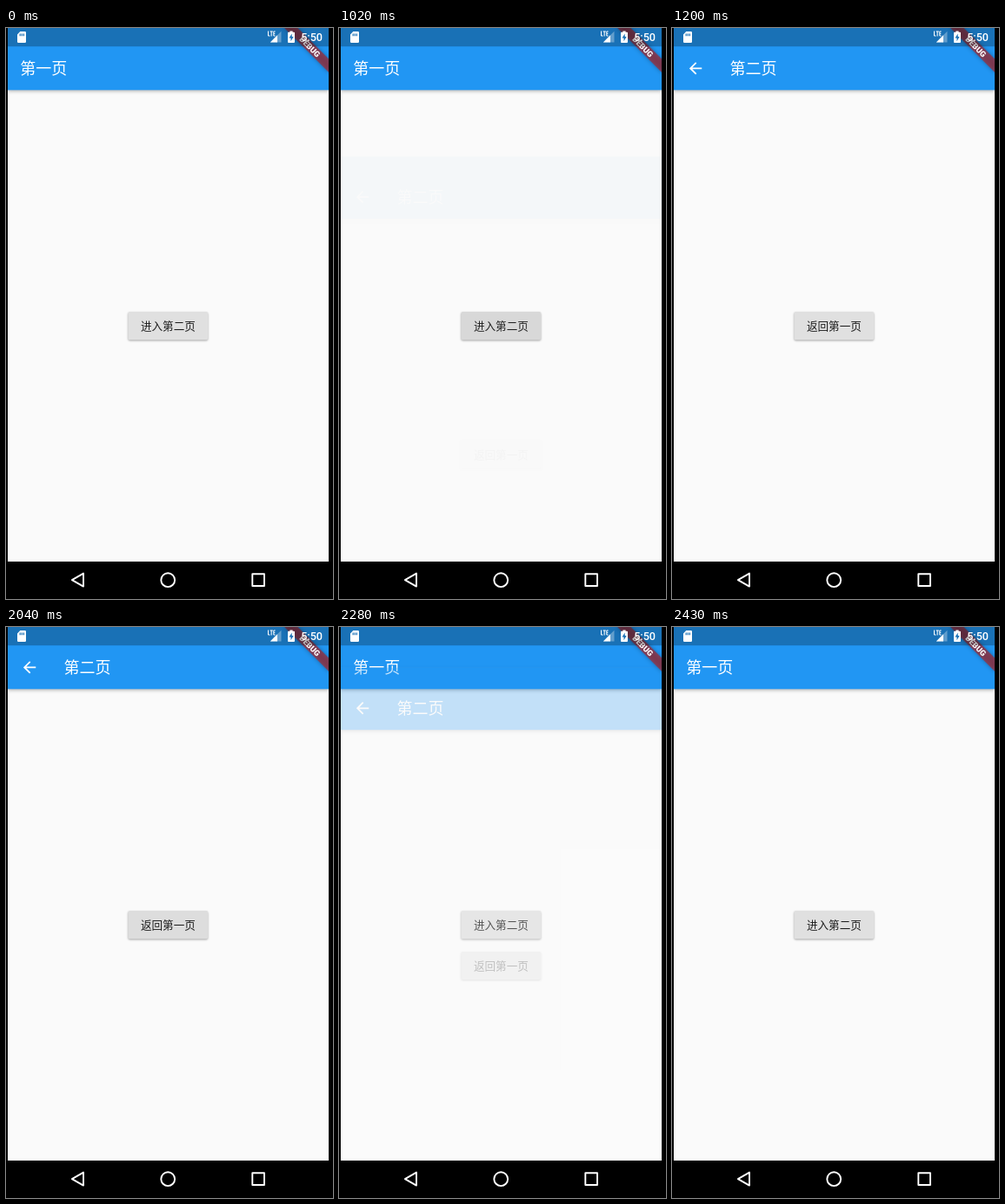
Write an HTML page that moves like this. It is 376 px wide and 656 px high and loops after 2.88 s.

```html
<!DOCTYPE html>
<html lang="zh-CN">
<head>
<meta charset="utf-8">
<title>页面跳转</title>
<style>
html, body { margin: 0; width: 100%; height: 100%; overflow: hidden; background: #000; }
svg { display: block; width: 376px; height: 656px; }
text { font-family: "Noto Sans CJK SC", "Noto Sans CJK", sans-serif; }
.title { font-size: 18px; fill: #fff; }
.label { font-size: 12.6px; fill: #000; fill-opacity: .87; text-anchor: middle; }
.bar { fill: #2196f3; filter: drop-shadow(0 1.5px 2px rgba(0, 0, 0, .32)); }
.button { fill: #e0e0e0; filter: drop-shadow(0 1.2px 1.2px rgba(0, 0, 0, .34)); }
.clock { font: 500 12.6px Roboto, sans-serif; fill: #fff; text-anchor: end; }
.debug { font: 900 9.16px Roboto, sans-serif; fill: #fff; text-anchor: middle; }
.ribbon { fill: #b71c1c; fill-opacity: .63; filter: drop-shadow(0 0 2.5px rgba(0, 0, 0, .5)); }
</style>
</head>
<body>
<svg viewBox="0 0 376 656">
  <defs>
    <clipPath id="screen"><rect x="2" y="0" width="369" height="613"/></clipPath>
  </defs>
  <rect width="376" height="656"/>
  <g clip-path="url(#screen)">
    <g id="first">
      <rect x="2" width="369" height="613" fill="#fafafa"/>
      <rect class="bar" x="2" width="369" height="71.3"/>
      <text class="title" x="16.2" y="53.4">第一页</text>
      <rect class="button" x="140.5" y="326" width="91.6" height="32.2" rx="1.8"/>
      <text class="label" x="186.4" y="346.8">进入第二页</text>
    </g>
    <g id="second">
      <rect x="2" width="369" height="613" fill="#fafafa"/>
      <rect class="bar" x="2" width="369" height="71.3"/>
      <path transform="translate(16.3 35.6) scale(.898)" fill="#fff"
        d="M20 11H7.83l5.59-5.59L12 4l-8 8 8 8 1.41-1.41L7.83 13H20z"/>
      <text class="title" x="66.5" y="53.4">第二页</text>
      <rect class="button" x="140.5" y="326" width="91.6" height="32.2" rx="1.8"/>
      <text class="label" x="186.4" y="346.8">返回第一页</text>
    </g>
    <g transform="translate(371 0) rotate(45)">
      <rect class="ribbon" x="-36" y="25.1" width="72" height="10.8"/>
      <text class="debug" x="0" y="33.8">DEBUG</text>
    </g>
    <rect x="2" width="369" height="21.2" fill-opacity=".25"/>
  </g>

  <!-- status icons -->
  <g fill="#fff">
    <path fill-rule="evenodd" d="M16.3 4H21.8Q23 4 23 5.2V15.8Q23 17 21.8 17H14.2Q13 17 13 15.8V7.4z
      M15.6 6.6v2.6h1.2V6.6z M17.7 6.6v2.6h1.2V6.6z M19.8 6.6v2.6h1.2V6.6z"/>
    <path d="M316.5 3.8V16.5H303.8z" fill-opacity=".32"/>
    <path d="M312 8.3V16.5H303.8z"/>
    <path d="M301.5 3.5V9H303.5 M303.6 4H306.8 M305.2 4V9.5 M309.6 4H307.8V9H309.6 M307.8 6.4H309.3"
      fill="none" stroke="#fff"/>
    <path d="M326.4 3.4h3.2v1.3h1.5q.9 0 .9.9v10.5q0 .9-.9.9h-6.2q-.9 0-.9-.9V5.600q0-.9.9-.9h1.500z"/>
    <path d="M328.7 6.6l-3.2 5h2v3.700l3.100-5.200h-1.900z" fill="#1970b6"/>
    <text class="clock" x="364" y="15.3">5:50</text>
  </g>

  <!-- navigation bar -->
  <g fill="none" stroke="#fff" stroke-width="1.9" stroke-linejoin="round">
    <path d="M89 626.6V641.6L75.900 634.1z"/>
    <circle cx="186.2" cy="634.2" r="7.9"/>
    <rect x="283.300" y="627.300" width="13.700" height="13.700"/>
  </g>
</svg>
<script>
const LOOP = 2880, STEP = 30, RISE = 153;
const second = document.querySelector('#second');
const [enter, back] = document.querySelectorAll('.button');

// [time, progress of the second page]
const route = [[990, 0], [1080, .34], [1110, .445], [1200, 1], [2113, 1], [2413, 0]];
// [time, grey level]
const enterPress = [[840, 224], [870, 218], [900, 216], [1200, 216], [1230, 224]];
const backPress = [[2010, 224], [2040, 221], [2070, 216]];

function sample(keys, t) {
  const i = keys.findIndex(k => k[0] > t);
  if (i < 0) return keys[keys.length - 1][1];
  if (i === 0) return keys[0][1];
  const [t0, a] = keys[i - 1], [t1, b] = keys[i];
  return a + (b - a) * (t - t0) / (t1 - t0);
}

function bezier(x1, y1, x2, y2) {
  const at = (a, b, u) => 3 * a * u * (1 - u) ** 2 + 3 * b * u * u * (1 - u) + u ** 3;
  return x => {
    if (x <= 0 || x >= 1) return x <= 0 ? 0 : 1;
    let lo = 0, hi = 1;
    for (let i = 0; i < 24; i++) {
      const mid = (lo + hi) / 2;
      if (at(x1, x2, mid) < x) lo = mid; else hi = mid;
    }
    return at(y1, y2, lo);
  };
}

const slide = bezier(.4, 0, .2, 1);
const fade = bezier(.42, 0, 1, 1);

function shade(button, level) {
  const v = Math.round(level);
  button.style.fill = `rgb(${v}, ${v}, ${v})`;
}

function draw(time) {
  const t = Math.floor(time % LOOP / STEP) * STEP;
  const p = sample(route, t);
  second.setAttribute('transform', `translate(0 ${(RISE * (1 - slide(p))).toFixed(2)})`);
  second.setAttribute('opacity', fade(p).toFixed(4));
  shade(enter, sample(enterPress, t));
  shade(back, sample(backPress, t));
}

const start = performance.now();
function tick() {
  draw(performance.now() - start);
  requestAnimationFrame(tick);
}
draw(0);
requestAnimationFrame(tick);
</script>
</body>
</html>
```
